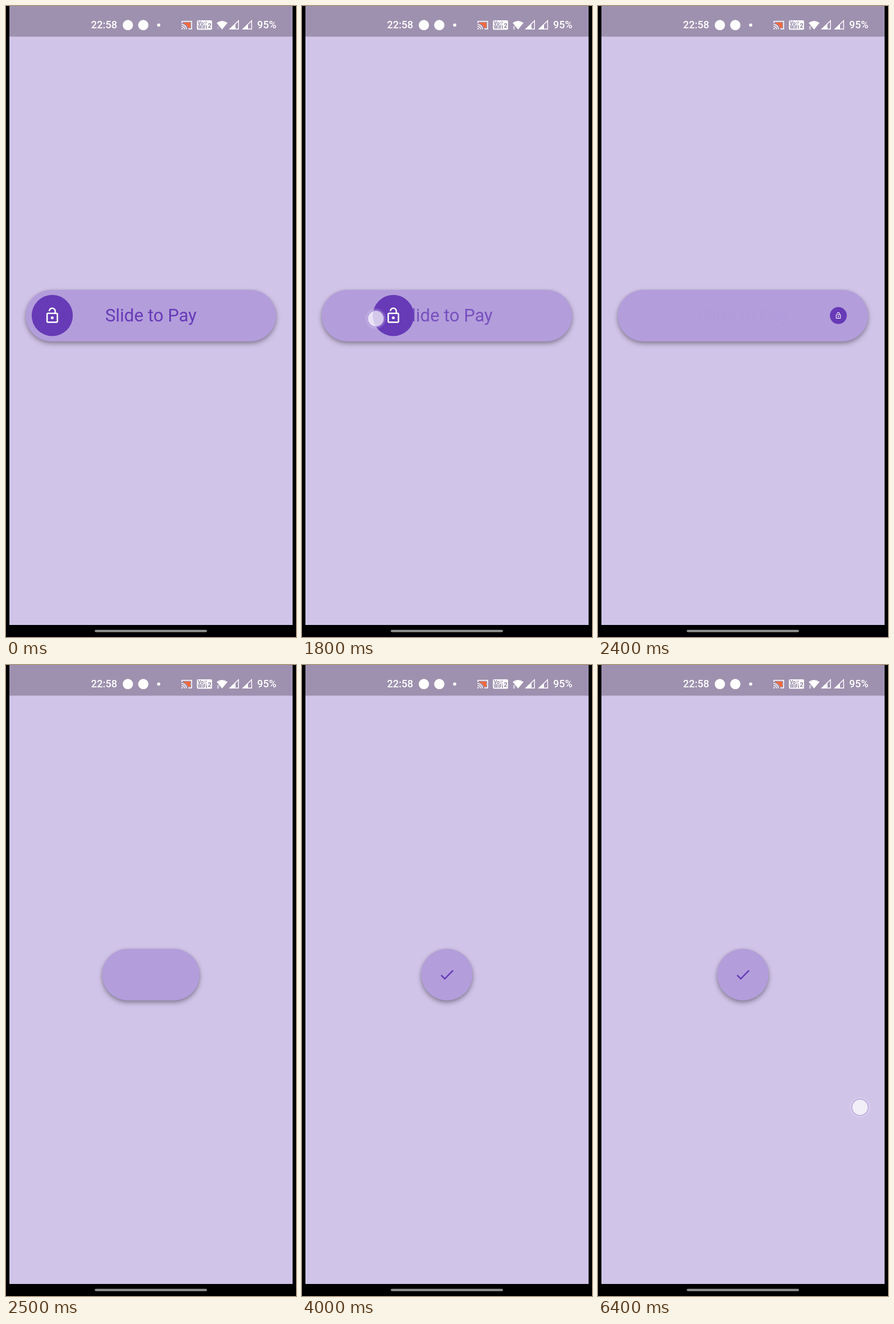
An HTML page that plays this animation: 508 px wide and 1102 px high, repeating every 6500 ms.

```html
<!DOCTYPE html>
<html lang="en">
<head>
<meta charset="utf-8">
<title>Slide to Pay</title>
<style>
  html, body { margin: 0; width: 100%; height: 100%; overflow: hidden; background: #000; }
  svg { display: block; }
  text { font-family: Roboto, sans-serif; }
  #pill { filter: drop-shadow(0 4px 4px rgba(0, 0, 0, .3)) drop-shadow(0 1px 2px rgba(0, 0, 0, .12)); }
</style>
</head>
<body>
<svg width="508" height="1102" viewBox="0 0 508 1102">
  <defs>
    <radialGradient id="halo">
      <stop offset=".72" stop-color="#fff" stop-opacity=".3"/>
      <stop offset="1" stop-color="#fff" stop-opacity="0"/>
    </radialGradient>
    <clipPath id="reveal"><rect id="window" x="238" y="525" width="0" height="32"/></clipPath>
  </defs>
  <rect x="6" width="496" height="1081" fill="#d0c4e8"/>
  <rect x="6" width="496" height="53.5" fill="#9e91af"/>
  <rect x="155.5" y="1089.5" width="196.5" height="4" rx="2" fill="#929292"/>

  <!-- Status bar -->
  <g fill="#fff">
    <g font-size="18" font-weight="500">
      <text x="149" y="39.3">22:58</text>
      <text x="440" y="39.3">95%</text>
    </g>
    <circle cx="213.5" cy="33.3" r="9"/>
    <circle cx="240.5" cy="33.3" r="9"/>
    <circle cx="267.5" cy="33.3" r="2.8"/>

    <path d="M311 29H323V38H319Q317 32 311 31Z" fill="#f8693c"/>
    <g fill="none" stroke="#fff" stroke-width="1.5">
      <path d="M308.2 30V26.8H325.2V40H319.5"/>
      <path d="M307.5 32.2A8.5 8.5 0 0 1 316 40.7M307.5 35.4A5.3 5.3 0 0 1 312.8 40.7"/>
    </g>
    <path d="M307.5 38.2A2.5 2.5 0 0 1 310 40.7H307.5Z"/>

    <rect x="334.5" y="25" width="26.5" height="16.5" rx="2"/>
    <g fill="#8f82a2" font-weight="700">
      <text x="336" y="32.8" font-size="8.5">Vo</text>
      <text x="336" y="40.4" font-size="8.5">WiFi</text>
      <text x="353.5" y="37.5" font-size="11">2</text>
    </g>
    <path d="M347.5 27.5q1.5 1.5 0 3.5M350 26.5q2 2 0 4.5" fill="none" stroke="#8f82a2"/>

    <path d="M369 29.5Q378.5 22.5 388 29.5L378.5 41Z"/>
    <path id="traffic" d="M369.5 37.5L371.5 35L373.5 37.5ZM369.5 39L371.5 41.2L373.5 39Z"/>

    <g stroke="#fff" stroke-width="1.4">
      <path d="M392 40.3H407.3V25.7Z" fill="none"/>
      <path d="M415 40.3H430.3V25.7Z" fill="none"/>
    </g>
    <path d="M391.5 41H402V31Z"/>
    <path d="M414.5 41H424V32Z"/>
  </g>

  <!-- Slider -->
  <rect id="pill" y="495.8" height="90" rx="45" fill="#b39ddb"/>
  <text id="label" x="253.8" y="551" font-size="30.86" text-anchor="middle" fill="#673ab7">Slide to Pay</text>
  <g id="knob">
    <circle r="36" fill="#673ab7"/>
    <path transform="scale(1.286) translate(-12 -12)" fill="#fff" d="M12 17c1.1 0 2-.9 2-2s-.9-2-2-2-2 .9-2 2 .9 2 2 2zm6-9h-1V6c0-2.76-2.24-5-5-5S7 3.24 7 6h1.9c0-1.71 1.39-3.1 3.1-3.1s3.1 1.39 3.1 3.1v2H6c-1.1 0-2 .9-2 2v10c0 1.1.9 2 2 2h12c1.1 0 2-.9 2-2V10c0-1.1-.9-2-2-2zm0 12H6V10h12v10z"/>
  </g>
  <g clip-path="url(#reveal)">
    <path transform="translate(253.9 540.8) scale(1.286) translate(-12 -12)" fill="#673ab7" d="M9 16.17L4.83 12l-1.42 1.41L9 19 21 7l-1.41-1.41z"/>
  </g>
  <g id="touch">
    <circle r="19" fill="url(#halo)"/>
    <circle r="14.2" fill="#fff" fill-opacity=".6" stroke="#8a68cc" stroke-opacity=".5" stroke-width="1.4"/>
  </g>
</svg>
<script>
const LOOP = 6500, STEP = 100;
const CENTER = 253.8, FULL = 438.5, ROUND = 90;
const DRAG_START = 1600, RESIZE = 2136, SHRINK = 2445, CHECK = 2750, PHASE = 300;
const dragX = [81, 95, 160, 255, 349, 421];

const el = id => document.getElementById(id);
const [pill, label, knob, touch, traffic, reveal] =
  ['pill', 'label', 'knob', 'touch', 'traffic', 'window'].map(el);
const clamp = (v, lo, hi) => Math.min(hi, Math.max(lo, v));

// Cubic-bezier easing, solved by bisection
function bezier(x1, y1, x2, y2) {
  const at = (a, b, s) => 3 * (1 - s) * (1 - s) * s * a + 3 * (1 - s) * s * s * b + s * s * s;
  return x => {
    let lo = 0, hi = 1;
    for (let i = 0; i < 24; i++) {
      const mid = (lo + hi) / 2;
      if (at(x1, x2, mid) < x) lo = mid; else hi = mid;
    }
    return at(y1, y2, (lo + hi) / 2);
  };
}
const easeInBack = bezier(.6, -.28, .735, .045);
const easeOutCirc = bezier(.075, .82, .165, 1);
const slowMiddle = bezier(.15, .85, .85, .15);

const phase = (t, start) => clamp((t - start) / PHASE, 0, 1);

function dragAt(t) {
  const p = clamp((t - DRAG_START) / STEP, 0, dragX.length - 1);
  const i = Math.min(Math.floor(p), dragX.length - 2);
  return dragX[i] + (dragX[i + 1] - dragX[i]) * (p - i);
}

// The touch dot trails the knob by a fraction of a step
function touchAt(t) {
  if (t >= 1600 && t < 2200) return [dragAt(t - 75) + 18, 544 + (t - 1600) / 100];
  if (t >= 5900 && t < 6000) return [445, 772.5];
  if (t >= 6400) return [459, 772.5];
  return null;
}

function draw(t) {
  const x = dragAt(t);
  const scale = 1 - easeInBack(phase(t, RESIZE));
  const width = FULL + (ROUND - FULL) * easeOutCirc(phase(t, SHRINK));
  const shown = 1 - Math.cos(slowMiddle(phase(t, CHECK)) * Math.PI / 2);
  const dot = touchAt(t);

  pill.setAttribute('x', CENTER - width / 2);
  pill.setAttribute('width', width);
  label.setAttribute('opacity', t < SHRINK ? 1 - (x - 81) / 346 : 0);
  knob.setAttribute('transform', `translate(${x} 540.6) scale(${scale})`);
  knob.setAttribute('visibility', t < SHRINK ? 'visible' : 'hidden');
  reveal.setAttribute('width', 32 * shown);
  traffic.setAttribute('opacity', t < 500 ? .3 : 1);
  touch.setAttribute('visibility', dot ? 'visible' : 'hidden');
  if (dot) touch.setAttribute('transform', `translate(${dot})`);
}

const begin = performance.now();
function tick() {
  const t = (performance.now() - begin) % LOOP;
  draw(Math.floor(t / STEP) * STEP);
  requestAnimationFrame(tick);
}
tick();
</script>
</body>
</html>
```
